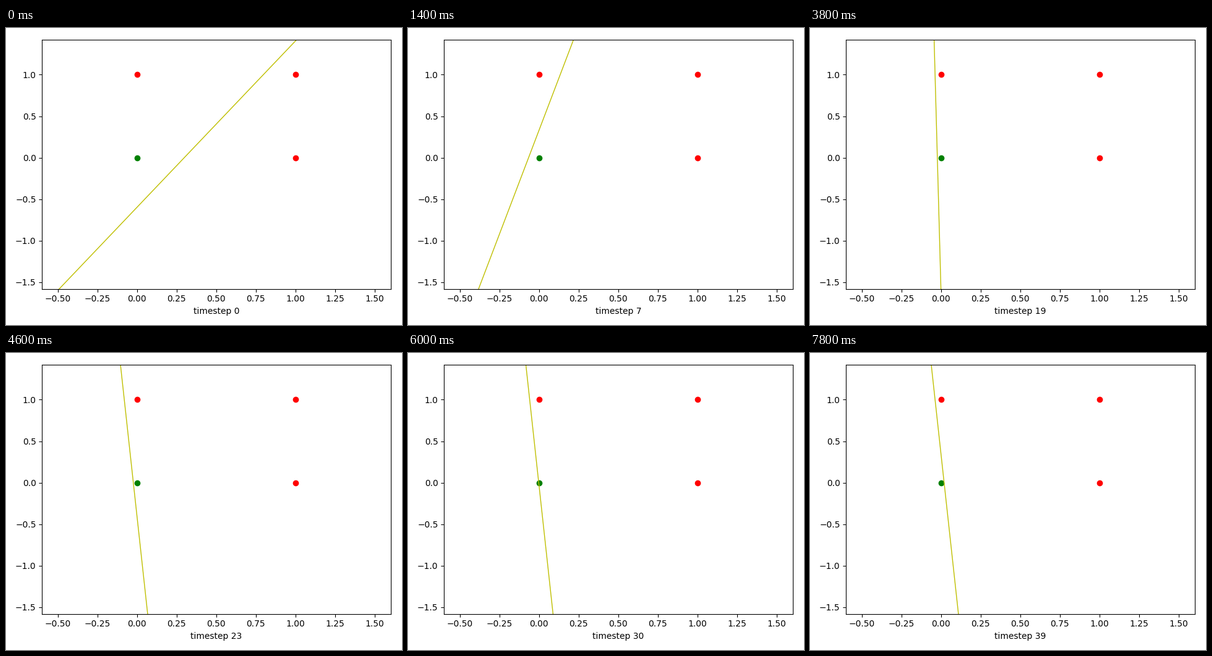
Write a matplotlib script that moves like this. It is 640 px wide and 480 px high and loops after 8 s.

```python
import numpy as np
import matplotlib.pyplot as plt
from matplotlib.animation import FuncAnimation

STEPS = 40
INTERVAL = 200
RATE = 0.01
WIDTH, HEIGHT, DPI = 640, 480, 100

# Columns: bias, x, y
points = np.array([[1, 0, 0], [1, 0, 1], [1, 1, 0], [1, 1, 1]])
labels = np.array([0, 1, 1, 1])


def train(weights):
    """Batch perceptron with a sign output; returns the weights per step."""
    history = [weights]
    for _ in range(STEPS - 1):
        error = labels - np.sign(points @ weights)
        weights = weights + RATE * error @ points
        history.append(weights)
    return history


history = train(np.array([-0.1388, 0.467, -0.2333]))
xs = np.array([-0.5, 1.5])

fig, ax = plt.subplots(figsize=(WIDTH / DPI, HEIGHT / DPI), dpi=DPI)
for (_, x, y), label in zip(points, labels):
    ax.plot(x, y, "ro" if label else "go")
line, = ax.plot(xs, xs, "y-", linewidth=1)
ax.set_xlim(-0.6, 1.6)
ax.set_ylim(-1.58, 1.424)
ax.set_xlabel("timestep 0")

# Fit the labels at the left and bottom, then widen the other two margins
fig.tight_layout()
fig.subplots_adjust(right=1 - 18.49 / WIDTH, top=1 - 18.51 / HEIGHT)


def update(step):
    bias, wx, wy = history[step]
    line.set_data(xs, -(bias + wx * xs) / wy)
    ax.set_xlabel(f"timestep {step}")
    return line, ax.xaxis.label


def reset():
    return update(0)


anim = FuncAnimation(fig, update, frames=STEPS, init_func=reset,
                     interval=INTERVAL, repeat=True, repeat_delay=0)
plt.show()
```
